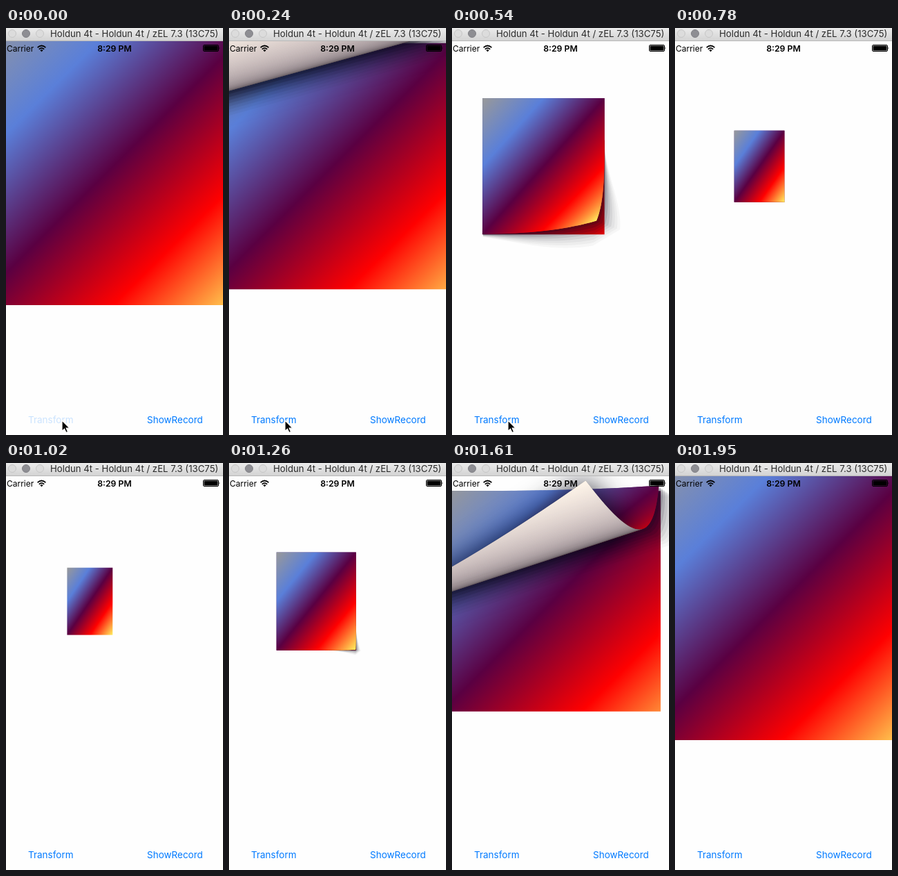
An HTML page with a canvas for the animation above (2050 ms loop, 314x586 px).

```html
<!DOCTYPE html>
<html lang="en">
<head>
<meta charset="utf-8">
<title>Page curl</title>
<style>
  html, body { margin: 0; width: 314px; height: 586px; overflow: hidden; background: #fefefe; }
  canvas, svg { position: absolute; left: 0; top: 0; display: block; }
  text { font-family: Inter, "Open Sans", sans-serif; }
  .button { font-size: 13.5px; fill: #007aff; }
</style>
</head>
<body>
<canvas id="stage" width="314" height="586"></canvas>
<svg width="314" height="586" viewBox="0 0 314 586">
  <defs>
    <linearGradient id="bar" x2="0" y2="1">
      <stop offset="0" stop-color="#ebebeb"/>
      <stop offset="1" stop-color="#d2d2d2"/>
    </linearGradient>
  </defs>
  <rect width="314" height="19" fill="url(#bar)"/>
  <rect y="18" width="314" height="1" fill="#b8b8b8"/>
  <g fill="#dcdcdc" stroke="#c6c6c6">
    <circle cx="9" cy="8" r="5.5"/>
    <circle cx="29" cy="8" r="5.5" fill="#8e8e93" stroke="#808085"/>
    <circle cx="49" cy="8" r="5.5"/>
  </g>
  <text x="64" y="13" font-size="13.2" fill="#2a2a2a">Holdun 4t - Holdun 4t / zEL 7.3 (13C75)</text>

  <text x="1" y="34" font-size="12">Carrier</text>
  <g fill="none" stroke="#000" stroke-width="1.7">
    <path d="M45.6 28.2Q51.5 22.8 57.4 28.2"/>
    <path d="M47.8 30.6Q51.5 27.2 55.2 30.6"/>
  </g>
  <path d="M49.4 32Q51.5 30.2 53.6 32L51.5 34.3Z"/>
  <text x="157" y="34" font-size="12.3" font-weight="600" text-anchor="middle">8:29 PM</text>
  <rect x="285.5" y="24.5" width="22" height="9" rx="1.5" fill="none" stroke="#000"/>
  <rect x="286.5" y="25.5" width="20" height="7" rx=".6"/>
  <path d="M308.6 27.3Q310.2 29 308.6 30.8Z"/>

  <text id="transform" class="button" x="32" y="569">Transform</text>
  <text class="button" x="204" y="569">ShowRecord</text>
  <path id="cursor" d="M0 0V15.5L3.5 12.2L6 17.6L8.6 16.5L6.2 11.2H11Z" stroke="#fff" stroke-width="1.2"/>
</svg>
<script>
const LOOP = 2050;
const LATE = [1560, 1610, 1660, 1720, 1780, 1840, 1890, 1950];
const COLORS = ['#999999', '#5a7fd9', '#5a0042', '#ff0000', '#fff260'];
const SMALL = { left: 88.4, top: 150.7, right: 154.3, bottom: 247.6 };
const LARGE = { left: -47, top: -1, right: 357, bottom: 399 };
const STEP = 2;

const ctx = document.getElementById('stage').getContext('2d');
const label = document.getElementById('transform');
const cursor = document.getElementById('cursor');

const clamp = x => Math.min(1, Math.max(0, x));
const ease = x => (x = clamp(x), x * x * (3 - 2 * x));
const mix = (a, b, p) => a + (b - a) * p;

const paint = ctx.createLinearGradient(0, 0, 1, 1);
COLORS.forEach((c, i) => paint.addColorStop(i / (COLORS.length - 1), c));

// The picture is refreshed in discrete ticks.
function tick(t) {
  return t < LATE[0] ? Math.floor(t / 60) * 60 : LATE.filter(s => s <= t).pop();
}

// 1 = large view, 0 = small view.
function sizeAt(t) {
  return t < 1000 ? 1 - ease((t - 43) / 805) : ease((t - 1058) / 840);
}

function fillView(w, h, style) {
  ctx.save();
  ctx.scale(w, h);
  ctx.fillStyle = style;
  ctx.fillRect(0, 0, 1, 1);
  ctx.restore();
}

// The view below keeps its large size, centred and cropped.
function drawBase(w, h) {
  const fullW = LARGE.right - LARGE.left, fullH = LARGE.bottom - LARGE.top;
  ctx.save();
  ctx.beginPath();
  ctx.rect(0, 0, w, h);
  ctx.clip();
  ctx.translate((w - fullW) / 2, (h - fullH) / 2);
  fillView(fullW, fullH, paint);
  ctx.restore();
}

// A sheet of w by h wrapped round a cylinder; d is measured along the curl direction.
function makeCurl(w, h, p) {
  const phi = (45 + 49 * p - 16.5 * p * p) * Math.PI / 180;
  const c = Math.cos(phi), s = Math.sin(phi);
  const R = 150 * (1 - (1 - p) ** 3);
  const end = w * c + h * s;
  const start = end - R * p * (3.38 + 1.05 * p ** 3);
  const angle = d => Math.max(0, (d - start) / R);
  const place = d => {
    const a = angle(d);
    if (a === 0) return d;
    return a < Math.PI ? start + R * Math.sin(a) : start - R * (a - Math.PI);
  };
  // Extent of the sheet across the curl direction at d.
  const span = d => [
    Math.max(-d * s / c, (d * c - w) / s),
    Math.min((h - d * s) / c, d * c / s)
  ];
  return { phi, R, start, end, angle, place, span };
}

// Outline of the sheet between d0 and d1, optionally spread outwards by height.
function outline(curl, d0, d1, spread = 0) {
  const low = [], high = [];
  const count = Math.max(2, Math.ceil((d1 - d0) / 4));
  for (let i = 0; i <= count; i++) {
    const d = mix(d0, d1, i / count);
    const z = curl.R * (1 - Math.cos(Math.min(Math.PI, curl.angle(d))));
    const ext = spread * 28 * (1 - Math.exp(-z / 35));
    const [b0, b1] = curl.span(d);
    const x = curl.place(d) + 1.25 * ext;
    low.push([x, b0 - ext]);
    high.unshift([x, b1 + ext]);
  }
  ctx.beginPath();
  low.concat(high).forEach(q => ctx.lineTo(...q));
  ctx.closePath();
}

function drawShadow(curl) {
  const d0 = Math.max(0, curl.start);
  const d1 = Math.min(curl.end, curl.start + curl.R * Math.PI / 2);
  if (d1 <= d0) return;
  ctx.save();
  ctx.rotate(curl.phi);
  for (let i = 8; i > 0; i--) {
    outline(curl, d0, d1, i / 8);
    ctx.fillStyle = `rgba(15,10,25,${0.03 + 0.0035 * (8 - i) ** 2})`;
    ctx.fill();
  }
  ctx.restore();
}

function drawStrip(curl, w, h, d0, d1, style) {
  const x0 = curl.place(d0);
  const k = (curl.place(d1) - x0) / (d1 - d0);
  if (Math.abs(k) < 0.002) return;
  ctx.save();
  ctx.rotate(curl.phi);
  ctx.translate(x0, 0);
  ctx.scale(k, 1);
  ctx.translate(-d0, 0);
  ctx.beginPath();
  ctx.rect(d0, -999, d1 - d0 + STEP, 1998);
  ctx.clip();
  ctx.rotate(-curl.phi);
  fillView(w, h, style);
  ctx.restore();
}

function backColor(angle) {
  const k = clamp(angle / (Math.PI / 2) - 1);
  const g = Math.min(255, 55 + 230 * Math.sqrt(k));
  return `rgb(${g},${g * mix(0.91, 0.98, k)},${g * mix(0.96, 0.9, k)})`;
}

function drawSheet(curl, w, h) {
  const half = curl.start + curl.R * Math.PI / 2;
  if (curl.start > 0) drawStrip(curl, w, h, -1, curl.start, paint);
  const first = Math.max(0, curl.start);
  for (let d = first; d < Math.min(half, curl.end); d += STEP) {
    drawStrip(curl, w, h, d, Math.min(d + STEP, half), paint);
  }
  if (half >= curl.end) return;

  const from = Math.max(0, half);
  ctx.save();
  ctx.rotate(curl.phi);
  ctx.shadowColor = 'rgba(0,0,15,.9)';
  ctx.shadowBlur = 40;
  outline(curl, from, curl.end);
  ctx.fillStyle = '#443f44';
  ctx.fill();
  ctx.restore();
  for (let d = from; d < curl.end; d += STEP) {
    drawStrip(curl, w, h, d, d + STEP, backColor(curl.angle(d + STEP / 2)));
  }
}

function draw(t) {
  const p = sizeAt(t);
  const side = name => mix(SMALL[name], LARGE[name], p);
  const left = side('left'), top = side('top');
  const w = side('right') - left, h = side('bottom') - top;

  ctx.clearRect(0, 0, 314, 586);
  ctx.save();
  ctx.translate(left, top);
  if (p < 0.001) {
    fillView(w, h, paint);
  } else {
    drawBase(w, h);
    const curl = makeCurl(w, h, p);
    if (curl.start + curl.R > -30) {
      drawShadow(curl);
      drawSheet(curl, w, h);
    }
  }
  ctx.restore();

  label.style.opacity = mix(0.2, 1, clamp((t - 30) / 180));
  const drop = Math.max(0, t - 540) / 120 * 22;
  cursor.setAttribute('transform', `translate(81 ${565 + drop})`);
  cursor.style.display = t < 720 ? '' : 'none';
}

const begin = performance.now();
function frame() {
  draw(tick((performance.now() - begin) % LOOP));
  requestAnimationFrame(frame);
}
frame();
</script>
</body>
</html>
```
